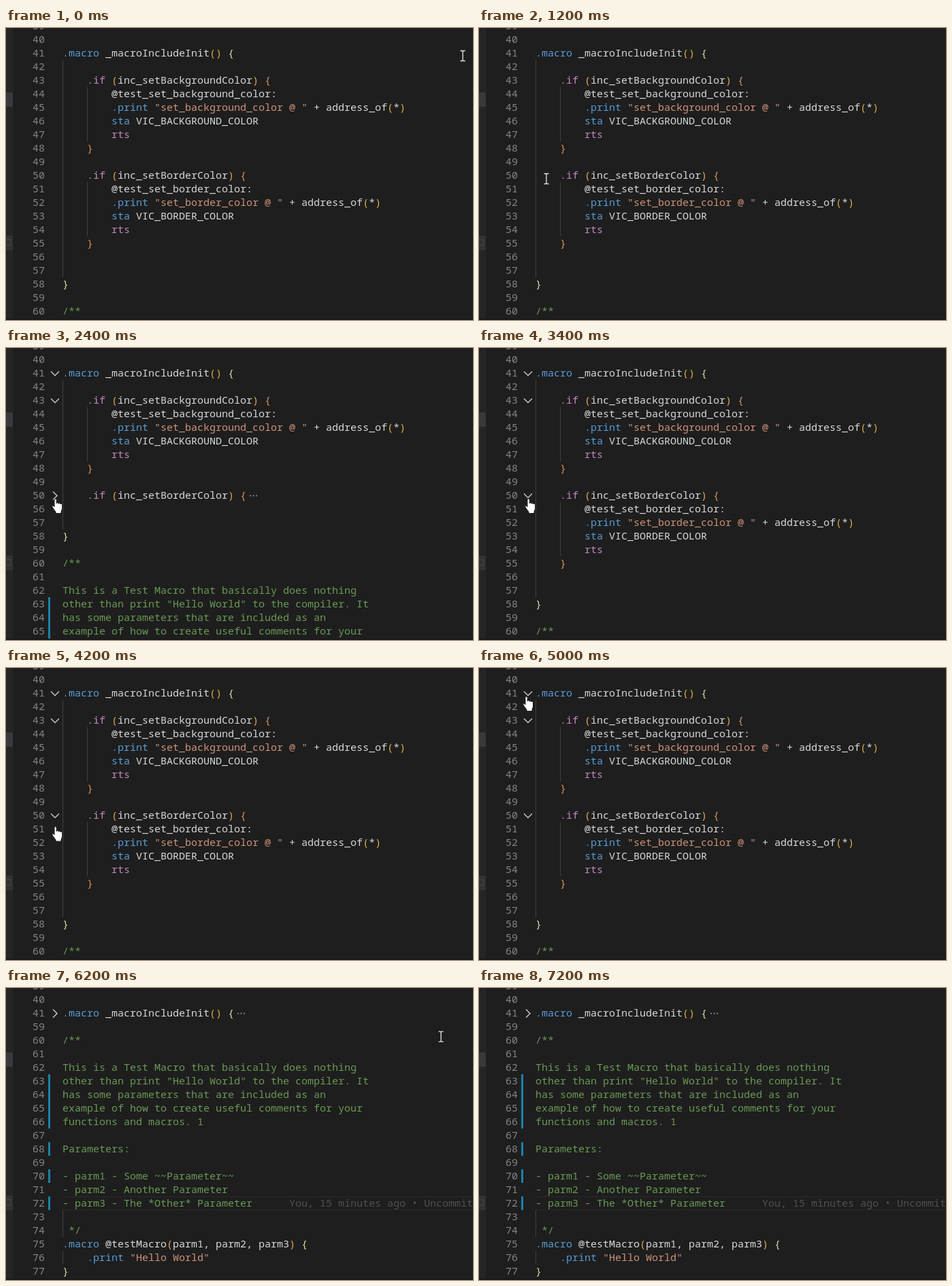
Write an HTML page that moves like this. It is 686 by 430 pixels and loops after 7.4 s.

```html
<!DOCTYPE html>
<html lang="en">
<head>
<meta charset="utf-8">
<title>Code folding</title>
<style>
  html, body { margin: 0; width: 100%; height: 100%; overflow: hidden; background: #1e1e1e; }
  body { position: relative; font: 15px/18px "Noto Sans Mono", monospace; color: #d8d8d8; }
  body *, svg { position: absolute; }
  #side { left: 0; top: 0; width: 10px; height: 100%; background: #252526; }
  #side i { left: 0; width: 10px; height: 21px; background: #39383e; }
  #side i + i { background: #323236; }
  #side b { left: 0; top: 311px; width: 7px; height: 9px; box-sizing: border-box; border: 1px solid #444448; border-left: 0; }
  #bottom { left: 0; bottom: 0; width: 100%; height: 2px; background: #191919; }
  #code { left: 0; top: -13px; width: 100%; }
  .row { position: relative; height: 20px; white-space: pre; }
  .num { left: 0; width: 57px; text-align: right; color: #858585; }
  .text { left: 83px; }
  .text span { position: static; }
  .guide { width: 1px; height: 20px; background: #404040; }
  .changed { left: 62px; width: 3px; height: 20px; background: #1b81a8; }
  .current { left: 83px; right: 0; height: 20px; box-sizing: border-box; border: solid #2a2a2a; border-width: 1px 0; }
  .blame { left: 416px; color: #505050; }
  #caret { left: 271px; width: 2px; height: 20px; background: #c4c4c0; }
  svg { left: 0; top: 0; overflow: visible; }
  .keyword { color: #569cd6; }
  .flow { color: #c586c0; }
  .string { color: #ce9178; }
  .paren { color: #e2a84b; }
  .brace { color: #d9915c; }
  .outer { color: #dcdcaa; }
  .comment { color: #6a9955; }
</style>
</head>
<body>
<div id="side"><i style="top:95px"></i><i style="top:306px"></i><b></b></div>
<div id="code"></div>
<div id="bottom"></div>
<svg id="mouse" width="1" height="1">
  <g id="beam" fill="none">
    <path d="M-3.5-7.5H-1L0-6.5 1-7.5H3.5M0-6.5V6.5M-3.5 7.5H-1L0 6.5 1 7.5H3.5" stroke="#e8e8e8" stroke-width="1.3"/>
  </g>
  <path id="hand" transform="translate(-7 -1)" fill="#fff" stroke="#111" stroke-width=".9"
    d="M5 13V2.5a1.6 1.6 0 0 1 3.2 0V8a1.5 1.5 0 0 1 3 .3 1.5 1.5 0 0 1 2.8.6 1.4 1.4 0 0 1 2.5.9V15c0 2.5-1.5 3.5-1.5 5.5v2H7v-2c-1-2-3.5-4.5-5-7.5C1.2 11 3.5 10.5 5 13z"/>
</svg>
<script>
const FIRST = 39, LOOP = 7400, STEP = 200;
const lines = `

.macro _macroIncludeInit() {

    .if (inc_setBackgroundColor) {
        @test_set_background_color:
        .print "set_background_color @ " + address_of(*)
        sta VIC_BACKGROUND_COLOR
        rts
    }

    .if (inc_setBorderColor) {
        @test_set_border_color:
        .print "set_border_color @ " + address_of(*)
        sta VIC_BORDER_COLOR
        rts
    }


}

/**

This is a Test Macro that basically does nothing
other than print "Hello World" to the compiler. It
has some parameters that are included as an
example of how to create useful comments for your
functions and macros. 1

Parameters:

- parm1 - Some ~~Parameter~~
- parm2 - Another Parameter
- parm3 - The *Other* Parameter

 */
.macro @testMacro(parm1, parm2, parm3) {
    .print "Hello World"
}`.split("\n");

const within = (n, ...ranges) => ranges.some(([a, b = a]) => n >= a && n <= b);

function highlight(line, n) {
  if (within(n, [60, 74])) return `<span class="comment">${line}</span>`;
  const kind = s => s[0] === '"' ? "string"
    : /[()]/.test(s) ? "paren"
    : /[{}]/.test(s) ? (line[0] === " " ? "brace" : "outer")
    : /if|rts/.test(s) ? "flow" : "keyword";
  return line.replace(/"[^"]*"|\.(macro|print|if)|\b(sta|rts)\b|[(){}]/g,
    s => `<span class="${kind(s)}">${s}</span>`);
}

function rowHtml(line, i) {
  const n = FIRST + i, end = 83 + 9 * line.length;
  const guide = x => `<div class="guide" style="left:${x}px"></div>`;
  let html = `<div class="num">${n}</div>`;
  if (within(n, [42, 57], [73, 74], [76])) html += guide(83);
  if (within(n, [44, 47], [51, 54])) html += guide(119);
  if (within(n, [63, 66], [68], [70], [72])) html += '<div class="changed"></div>';
  if (n === 72) html += '<div class="current"></div><div class="blame">You, 15 minutes ago • Uncommitted changes</div>';
  html += `<div class="text">${highlight(line, n)}</div>`;
  if (n === 72) html += '<div id="caret"></div>';
  if (within(n, [41], [43], [50], [72], [75]))
    html += `<svg width="1" height="1"><path class="chevron" fill="none" stroke="#c5c5c5" stroke-width="1.5"/>
      <path class="dots" d="M${end + 6} 10.5h0m4.5 0h0m4.5 0h0" stroke="#909090" stroke-width="2.2" stroke-linecap="round"/></svg>`;
  return `<div class="row">${html}</div>`;
}

const byId = id => document.getElementById(id);
byId("code").innerHTML = lines.map(rowHtml).join("");
const rows = [...document.querySelectorAll(".row")];

// Pointer stops: time, x, y
const path = [
  [0, 671, 41], [1200, 99, 222], [2000, 73, 222], [3400, 73, 222],
  [4400, 73, 235], [5000, 70, 42], [5400, 70, 42], [6400, 705, 75], [LOOP, 705, 75]
];

function pointerAt(t) {
  const k = path.findIndex(p => p[0] > t);
  const [t0, x0, y0] = path[k - 1], [t1, x1, y1] = path[k];
  const u = (t - t0) / (t1 - t0), e = u * u * (3 - 2 * u);
  return [x0 + (x1 - x0) * e, y0 + (y1 - y0) * e];
}

const clamp = v => Math.max(0, Math.min(1, v));

function render(time) {
  const t = Math.floor(time / STEP) * STEP;
  const folded = { 41: t >= 5400, 50: t >= 2400 && t < 3400 };
  const hover = Math.min(clamp((t - 1400) / 400), clamp((6000 - t) / 400));

  rows.forEach((row, i) => {
    const n = FIRST + i;
    const hidden = folded[41] && within(n, [42, 58]) || folded[50] && within(n, [51, 55]);
    row.style.display = hidden ? "none" : "";
    const chevron = row.querySelector(".chevron");
    if (!chevron) return;
    chevron.setAttribute("d", folded[n] ? "M69 4.5L75 10.5 69 16.5" : "M66 7.5L72 13.5 78 7.5");
    chevron.style.opacity = folded[n] ? 1 : hover;
    row.querySelector(".dots").style.display = folded[n] ? "" : "none";
  });

  byId("caret").style.display = (t - 5400) % 1000 < 500 ? "" : "none";

  const [x, y] = pointerAt(t), inGutter = x < 83;
  byId("mouse").style.transform = `translate(${x}px, ${y}px)`;
  byId("hand").style.display = inGutter ? "" : "none";
  byId("beam").style.display = inGutter ? "none" : "";
}

const start = performance.now();
(function tick() {
  render((performance.now() - start) % LOOP);
  requestAnimationFrame(tick);
})();
</script>
</body>
</html>
```
